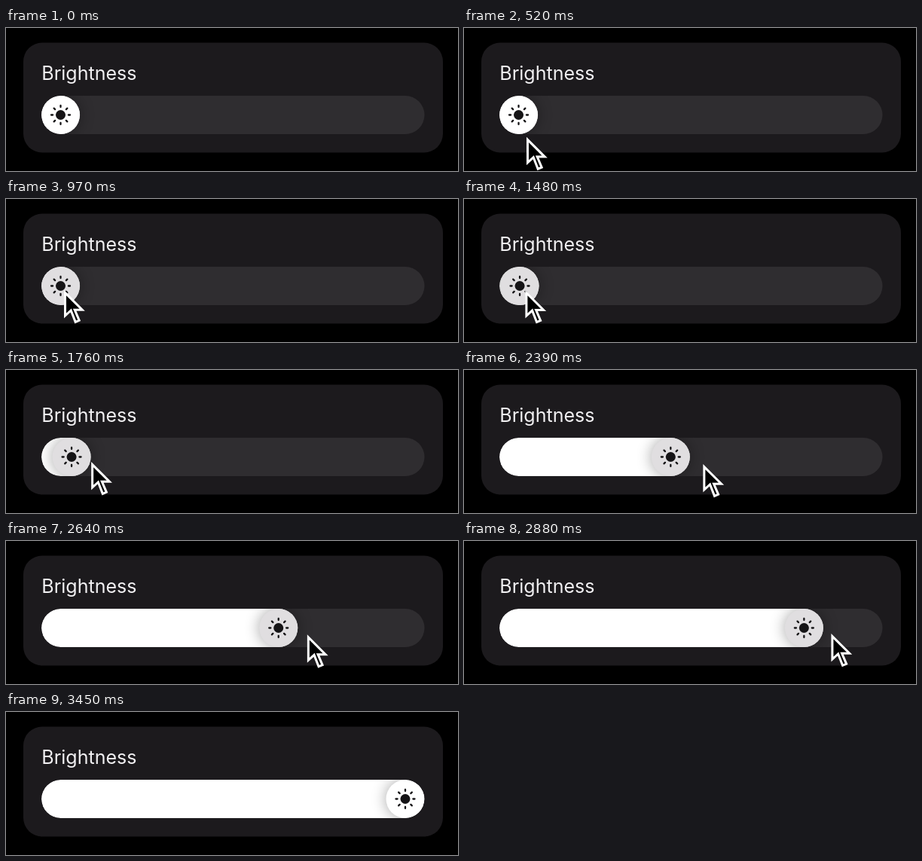
Write an HTML page that moves like this. It is 600 px wide and 190 px high and loops after 4.51 s.

```html
<!DOCTYPE html>
<html lang="en">
<head>
<meta charset="utf-8">
<title>Brightness slider</title>
<style>
  html, body { margin: 0; width: 100%; height: 100%; overflow: hidden; background: #000; }
  svg { display: block; width: 600px; height: 190px; }
  text { font: 400 25px Inter, Roboto, sans-serif; fill: #f1f0f2; }
</style>
</head>
<body>
<svg viewBox="0 0 600 190">
  <defs>
    <clipPath id="pill"><rect x="47" y="90" width="508.5" height="51" rx="25.5"/></clipPath>
    <filter id="soft" x="-1" y="-1" width="3" height="3"><feGaussianBlur stdDeviation="10"/></filter>
  </defs>
  <rect x="23" y="19.5" width="557" height="146" rx="25" fill="#1c1a1d"/>
  <text x="47.3" y="69">Brightness</text>
  <g clip-path="url(#pill)">
    <rect x="47" y="90" width="509" height="51" fill="#2f2d30"/>
    <rect id="fill" x="47" y="90" height="51" rx="25.5" fill="#fff"/>
    <g id="knob">
      <circle r="25.5" fill="#000" opacity=".36" filter="url(#soft)"/>
      <circle id="face" r="25.5"/>
      <circle r="6.5" fill="#151416"/>
      <g id="rays" stroke="#151416" stroke-width="2.3" stroke-linecap="round"></g>
    </g>
  </g>
  <path id="cursor" d="M1.5 3.6V34L9.2 27L15.2 42.4L20.2 40.3L14.2 26.3H24.2Z"
        fill="#000" stroke="#fff" stroke-width="3" stroke-miterlimit="6"/>
</svg>
<script>
const LOOP = 4510, SHOW = 180, REST = 820, PRESS = 970, RELEASE = 3450;

// Drag: time, pointer x, pointer y, knob x
const drag = [
  [1360, 77, 121, 72.5],
  [1760, 113, 122, 87],
  [2030, 193, 122.5, 167],
  [2390, 317, 125, 274],
  [2880, 487, 123, 451],
  [2970, 533, 121, 486],
  [3210, 575, 116, 530]
];

const $ = id => document.getElementById(id);
const fill = $('fill'), knob = $('knob'), face = $('face'), cursor = $('cursor');

$('rays').innerHTML = Array.from({ length: 8 }, (_, i) =>
  `<path d="M0-10.4V-12.5" transform="rotate(${i * 45})"/>`).join('');

function secant(i, k) {
  const a = drag[i], b = drag[i + 1];
  return a && b ? (b[k] - a[k]) / (b[0] - a[0]) : 0;
}

function slope(i, k) {
  const p = secant(i - 1, k), q = secant(i, k);
  return p * q > 0 ? 2 * p * q / (p + q) : 0;
}

// Monotone cubic through column k of the drag
function at(t, k) {
  const last = drag.length - 1;
  if (t <= drag[0][0]) return drag[0][k];
  if (t >= drag[last][0]) return drag[last][k];
  const i = drag.findIndex(p => p[0] > t) - 1;
  const a = drag[i], b = drag[i + 1];
  const h = b[0] - a[0], s = (t - a[0]) / h, r = 1 - s;
  return a[k] * (1 + 2 * s) * r * r + b[k] * s * s * (3 - 2 * s)
    + h * s * r * (slope(i, k) * r - slope(i + 1, k) * s);
}

function draw(t) {
  const knobX = at(t, 3);
  // The pointer glides in from below, slowing as it lands
  const away = Math.min(1, Math.max(0, (REST - t) / (REST - SHOW))) ** 1.3;
  const tipX = at(t, 1) + 16 * away, tipY = at(t, 2) + 64 * away;
  fill.setAttribute('width', knobX + 25.5 - 47);
  knob.setAttribute('transform', `translate(${knobX} 115.5)`);
  face.setAttribute('fill', t >= PRESS && t < RELEASE ? '#e0dee0' : '#fff');
  cursor.setAttribute('visibility', t >= SHOW && t < RELEASE ? 'visible' : 'hidden');
  cursor.setAttribute('transform', `translate(${tipX} ${tipY})`);
}

const start = performance.now();
function tick() {
  draw((performance.now() - start) % LOOP);
  requestAnimationFrame(tick);
}
tick();
</script>
</body>
</html>
```
